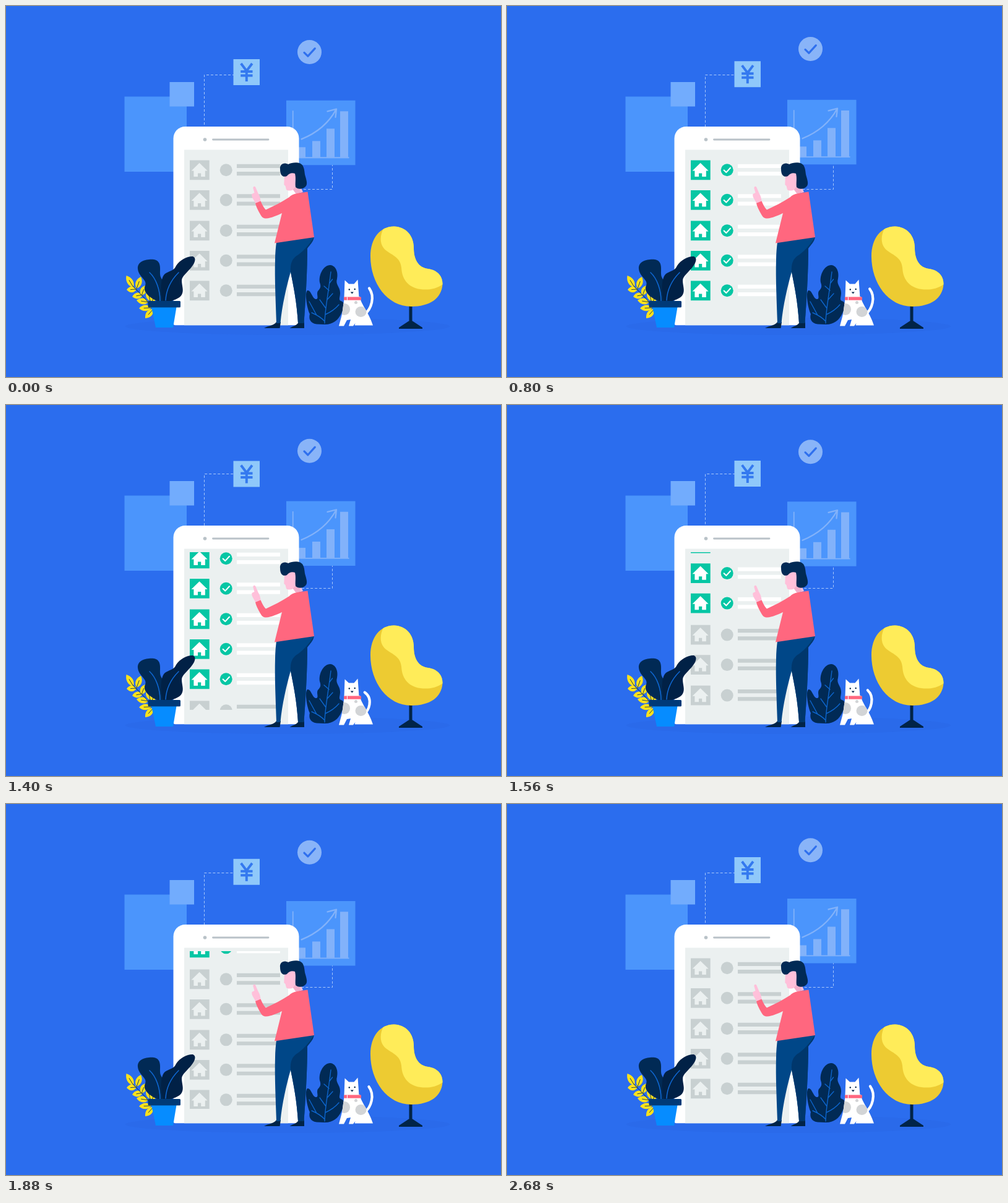
Recreate the animation shown at these times as an HTML page with a canvas. Size 800 px wide and 600 px high, loop 2700 ms.

```html
<!DOCTYPE html>
<html lang="en">
<head>
<meta charset="utf-8">
<title>House list</title>
<style>
  html, body { margin: 0; width: 100%; height: 100%; overflow: hidden; background: #2b6dee; }
  canvas { display: block; width: 800px; height: 600px; }
</style>
</head>
<body>
<canvas id="stage" width="800" height="600"></canvas>
<script>
const ctx = document.getElementById('stage').getContext('2d');
const LOOP = 2700, STEP = 20;
const NAVY = '#012a55', INK = '#012448', GREY = '#c8d0d1', SCREEN = '#ebf0f0', GREEN = '#06c6a4';
const PANEL = '#4b95fc', PALE = '#82b2fa', PINK = '#ffc0da', CORAL = '#ff677f', YELLOW = '#ffe21b';

const ROW_TOPS = [249.5, 298, 347.5, 396, 444.5];
const LIST_HEIGHT = 246;

const clamp = v => Math.max(0, Math.min(1, v));
const mix = (a, b, k) => a + (b - a) * k;
const wave = (t, mid, amp, peak, period = LOOP) => mid + amp * Math.cos((t - peak) / period * 2 * Math.PI);

// Cubic ease with flat ends; x1 and x2 are the handle lengths.
function ease(x, x1, x2) {
  if (x <= 0 || x >= 1) return clamp(x);
  let lo = 0, hi = 1;
  for (let i = 0; i < 24; i++) {
    const s = (lo + hi) / 2, r = 1 - s;
    if (3 * r * r * s * x1 + 3 * r * s * s * x2 + s * s * s < x) lo = s; else hi = s;
  }
  return lo * lo * (3 - 2 * lo);
}

function rect(color, x, y, w, h, radius = 0) {
  ctx.fillStyle = color;
  ctx.beginPath();
  ctx.roundRect(x, y, w, h, radius);
  ctx.fill();
}

function disc(color, x, y, rx, ry = rx) {
  ctx.fillStyle = color;
  ctx.beginPath();
  ctx.ellipse(x, y, rx, ry, 0, 0, 2 * Math.PI);
  ctx.fill();
}

function shape(color, d) {
  ctx.fillStyle = color;
  ctx.fill(new Path2D(d));
}

function line(color, width, d, cap = 'round') {
  ctx.strokeStyle = color;
  ctx.lineWidth = width;
  ctx.lineCap = cap;
  ctx.lineJoin = cap === 'round' ? 'round' : 'miter';
  ctx.stroke(new Path2D(d));
}

function at(x, y, draw) {
  ctx.save();
  ctx.translate(x, y);
  draw();
  ctx.restore();
}

function inside(d, draw) {
  ctx.save();
  ctx.clip(new Path2D(d));
  draw();
  ctx.restore();
}

function dashes(d, phase, t) {
  ctx.save();
  ctx.setLineDash([4, 3]);
  ctx.lineDashOffset = -phase - 35 * t / LOOP;
  line('#a9c8fa', 1, d, 'butt');
  ctx.restore();
}

function drawChart() {
  rect(PANEL, 0, 0, 111.5, 104.5);
  [[18, 75.5], [42, 65.5], [65, 45.5], [87, 17.3]].forEach(([x, y]) => rect(PALE, x, y, 13, 92 - y));
  line(PALE, 1.8, 'M10.7 16.5V92.4H101.5', 'butt');
  line(PALE, 2.3, 'M24.5 62.5C48 53 68 37.5 80.5 14.5M66.5 17.5L81 13.8L79.5 27');
}

function drawYen() {
  rect('#8fc8fa', 0, 0, 42.5, 42);
  line('#3479ef', 4, 'M12.3 7L21.3 19L30.3 7M21.3 18V36M11.7 20H31M11.7 26.5H31', 'butt');
}

function drawBadge() {
  disc('#89b4f8', 0, 0, 19.5);
  line('#2f70ee', 3.2, 'M-8.5 .8L-2.6 6.6L8.8 -6');
}

function drawBackdrop(t) {
  rect('#2b6dee', 0, 0, 800, 600);
  disc('#2a6aea', 455, 518, 262, 14);
  rect(PANEL, 191.5, 146.5, 100.5, 121.5);
  rect('#72acfd', 264.5, 123, 39.5, 39.5);
  dashes('M320.5 200V111.5H368', 1, t);
  dashes('M478 296.5H527.5V250', 3, t);
  at(453, wave(t, 154, 2.9, 1850), drawChart);
  at(367.5, wave(t, 88.25, 2.25, 1300), drawYen);
  at(490.5, wave(t, 74.1, 4.6, 2070), drawBadge);
}

function drawRow(done) {
  const main = done ? GREEN : GREY;
  rect(main, 0, 0, 31.7, 31.7);
  shape(done ? '#fff' : SCREEN, 'M15.6 4.3L28.6 17H24.8V26.5H18.2V21H13V26.5H6.4V17H2.6Z');
  disc(main, 58.7, 15.8, 10);
  if (done) line('#fff', 2.1, 'M53.6 16L57.3 19.6L64 12.3');
  rect(done ? '#fff' : GREY, 76, 6.3, 70, 6.2);
  rect(done ? '#fff' : GREY, 76, 18.6, 70, 6.2);
}

function drawList(t) {
  const scroll = LIST_HEIGHT * ease((t - 1345) / 864, .16, .08);
  inside('M288 238H456V493H288Z', () => {
    ROW_TOPS.forEach((top, i) => {
      const done = clamp((t - 160 - 120 * i) / 100);
      at(297, top - scroll, () => {
        if (done < 1) drawRow(false);
        ctx.globalAlpha = done;
        if (done > 0) drawRow(true);
      });
      at(297, top + LIST_HEIGHT - scroll, () => drawRow(false));
    });
  });
}

function drawPhone(t) {
  rect('#fff', 270.5, 195, 203, 321.2, [19, 19, 3, 3]);
  rect(SCREEN, 288, 232.5, 168, 283.7);
  disc('#b9c2c8', 321.5, 216, 2.8);
  line('#b9c2c8', 2.8, 'M334.5 216H424');
  drawList(t);
}

function drawMan() {
  shape(INK, 'M417 521C424 517 433 517 437 511H444L442.5 521Z M458.5 521C465 517 470 517 473 511H482V521Z');
  shape('#004788', 'M437 382L498 373C497 381 491 386 487 392C487 430 484 480 481.5 513H472C470 480 465 455 460 430C453 455 446 485 443.5 513H437C436 480 434 440 435 410C435 400 436 390 437 382Z');
  shape('#00376c', 'M460 430C459 416 463 409 469 404.5C479 398 489 388 497.5 374C497 381 491 386 487 392C487 430 484 480 481.5 513H472C470 480 465 455 460 430Z');
  shape(PINK, 'M450 272L468 269L476 292L480 301L469 304L464 297C461 299 455 299 453 297L451.5 291L449.3 289Z');
  shape('#f2adca', 'M463.8 297L467 293L473 295L477 301L469 304Z');
  shape(NAVY, 'M443 264C442 256 449 252 456 256C464 252 477 252 480 259C483 265 482 270 484 276C487 286 487 290 483 293C478 297 471 296 468 293C467 286 469 279 467 271C462 269 457 271 454 275C447 278 443 273 443 264Z');
  shape(PINK, 'M403.5 320C401 313 396 309 397.5 304L401.5 302L399.2 294Q400.5 290 403.3 293L407.5 303Q411 308 411.7 317Z');
  shape(CORAL, 'M458 309C463 304 468 303 487.5 300.5L498 374L434 383.5L446 335C438 339 428 343 421 343.5C416 344 413 341 411 337C407 330 404 324 403 319L411.5 315.5C414 321 417 327 420 329.5C432 324 446 317 458 309Z');
}

function drawLeaf(tipX, tipY, baseX, baseY) {
  const length = Math.hypot(tipX - baseX, tipY - baseY);
  at(baseX, baseY, () => {
    ctx.rotate(Math.atan2(tipY - baseY, tipX - baseX));
    shape(YELLOW, `M0 0C${length * .3} -7 ${length * .7} -6 ${length} 0C${length * .7} 6 ${length * .3} 7 0 0Z`);
    line(NAVY, .8, `M0 0H${length * .6}`);
  });
}

function drawPottedPlant() {
  [
    [194.5, 436, 206, 455], [218, 438, 211, 457], [195, 459, 211, 458],
    [225, 452, 219, 468], [204, 470, 221, 467], [229, 459, 233, 477], [240, 465, 236, 479],
    [211, 476, 230, 479], [215, 489, 235, 488], [225, 505, 238, 490]
  ].forEach(leaf => drawLeaf(...leaf));
  line(NAVY, 1, 'M205 453C215 464 227 474 238 490');
  shape(NAVY, 'M246 478C232 472 220 462 225 452C229 443 214 438 213 425C212 412 228 409 239 410C251 412 249 424 249 433C249 440 254 444 257 450L262 478Z');
  shape('#012146', 'M254 478C249 464 249 440 257 433C264 428 271 429 275 420C281 410 295 404 302 405C309 408 304 417 300 422C294 430 284 437 284 444C284 452 288 460 284 467C280 474 268 476 266 478Z');
  line('#0f68d3', 1.5, 'M249 477C249 460 243 441 232 431M258 476C259 458 268 442 279 431');
  shape('#068cff', 'M235 487H275.5L270 520H242Z');
  rect('#003a78', 229.5, 477, 52.5, 10.5, 1.5);
}

function drawShrub() {
  shape(NAVY, 'M502 514.5C491 513 489 505 491 498C487 491 482 465 487 460C493 459 494 471 500 474C507 475 501 466 504 461C509 456 509 453 507 447C505 435 513 419 524 419C534 420 537 432 535 441C532 451 540 454 540 464C540 471 537 475 541 477C549 479 547 489 542 497C537 509 526 516 514 515Z');
  line('#0d65cc', 1.4, 'M515 513C515 493 521 465 525 430M523 448L527.5 442M522 460L514 453M519 475L528 465M517 489L507 475M516 499C525 495 533 489 538 483M515 510C509 503 501 499 494 496M502 500L490 478');
}

function drawCat(t) {
  const lift = wave(t, .5, .5, 0, 900);
  const x = (low, high) => mix(low, high, lift);
  line('#fff', 4.2, `M579 499C${x(586, 591)} ${x(496, 490)} ${x(594, 596.5)} ${x(475, 470)} ${x(579.5, 587)} ${x(465, 456.5)}`);
  const body = 'M547 470H572C573 482 586 494 593 516.5H563.5L564.5 513L561 517.5H554L557 507L551 508L546 517.5H538C541 506 543 500 544 492C545 484 546 478 547 470Z';
  shape('#fff', body);
  inside(body, () => {
    disc('#d2d4d6', 547, 490.5, 9, 9.5);
    disc('#d2d4d6', 573.5, 494.5, 9, 8.5);
    disc('#d2d4d6', 565.5, 479.5, 2.5);
  });
  shape('#fff', 'M547.5 443.5L554 449.5H562.5L568.5 442.5L570.5 471H546.5Z');
  rect(CORAL, 546, 470.5, 28, 5.3, 1);
  line('#fff', 1, 'M551.5 470.5V475.8', 'butt');
  disc(INK, 554.8, 458.5, 1.2);
  disc(INK, 563.7, 458, 1.2);
  shape(INK, 'M556.7 462.5H561.8L559.3 465.5Z');
}

function drawChair() {
  const seat = 'M589 405C589 375 605 356.5 627 356.5C646 357 659 371 659 391C659 411 667 423 682 425C698 427 706 438 705.5 450C704 473 685 486 655 486C616 486 589 448 589 405Z';
  rect(INK, 651.5, 484, 5, 30);
  shape(INK, 'M635 520L651 509.5H657L673 520V522H635Z');
  shape('#edcb32', seat);
  inside(seat, () => shape('#ffec59', 'M616 350C604 366 603 382 610 391C618 402 637 403 639 423C640 444 652 457 674 458.5C689 459 700 456 712 445V340Z'));
}

function draw(t) {
  drawBackdrop(t);
  drawPhone(t);
  drawShrub();
  drawMan();
  drawPottedPlant();
  drawCat(t);
  drawChair();
}

// The picture advances in even steps; the small lead absorbs clock rounding.
function tick() {
  draw(Math.floor((performance.now() + 2) / STEP) * STEP % LOOP);
  requestAnimationFrame(tick);
}
tick();
</script>
</body>
</html>
```
